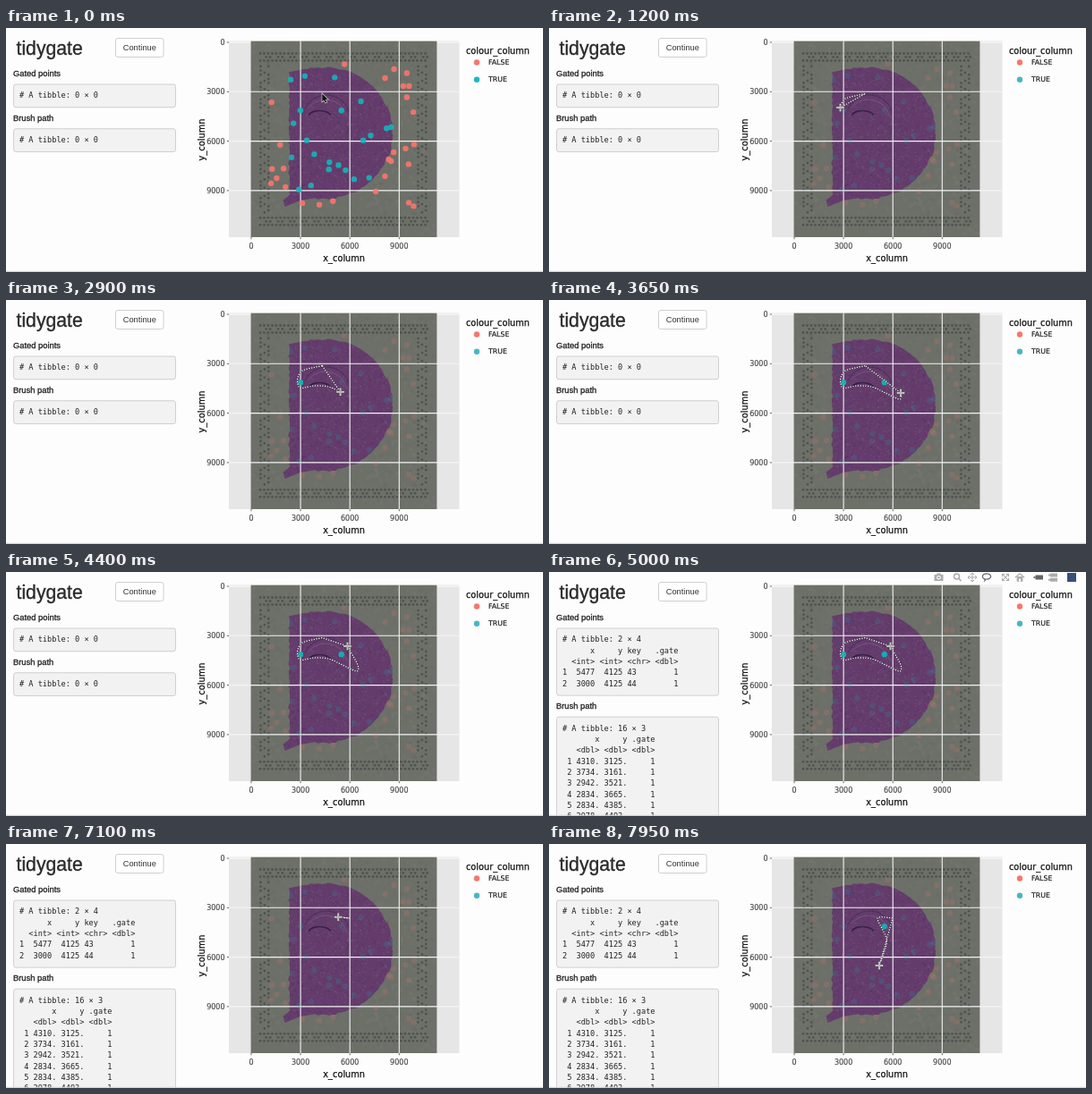
An HTML page with a canvas for the animation above (8 s loop, 600 px wide and 273 px high).

```html
<!DOCTYPE html>
<html lang="en">
<head>
<meta charset="utf-8">
<title>tidygate</title>
<style>
html, body { margin: 0; width: 100%; height: 100%; overflow: hidden; background: #fdfdfd; }
canvas { display: block; width: 600px; height: 273px; }
</style>
</head>
<body>
<canvas id="stage"></canvas>
<script>
const W = 600, H = 273, LOOP = 8000;
const PRESS = 600, TABLES = 4700, SECOND = 6900;
const SANS = '"Liberation Sans", Arial, sans-serif';
const PLOT = '"DejaVu Sans", Verdana, sans-serif';
const MONO = '"DejaVu Sans Mono", monospace';
const SALMON = '#f8766d', TEAL = '#14b4ba', PAGE = '#fdfdfd';
const dpr = window.devicePixelRatio || 1;

function makeCanvas(el) {
  el.width = W * dpr;
  el.height = H * dpr;
  const c = el.getContext('2d');
  c.scale(dpr, dpr);
  return c;
}
const ctx = makeCanvas(document.getElementById('stage'));
const plot = document.createElement('canvas');
const probe = document.createElement('canvas').getContext('2d');
const inPath = (path, x, y) => probe.isPointInPath(path, x, y);

// Lasso key points: time, x, y
const LASSO_A = [[PRESS, 353.3, 73.5], [1000, 331, 79], [1200, 325.5, 89], [1600, 328.5, 98.5],
  [2100, 344, 96], [2600, 362, 97.5], [3350, 391, 111], [3650, 393, 104], [4400, 381.5, 83]];
const LASSO_B = [[SECOND, 384, 83], [7200, 367, 83], [7600, 377.5, 108], [7950, 369, 136]];

const GATED = ['# A tibble: 2 × 4', '      x     y key   .gate', '  <int> <int> <chr> <dbl>',
  '1  5477  4125 43        1', '2  3000  4125 44        1'];
const BRUSH = ['# A tibble: 16 × 3', '       x     y .gate', '   <dbl> <dbl> <dbl>',
  ' 1 4310. 3125.     1', ' 2 3734. 3161.     1', ' 3 2942. 3521.     1',
  ' 4 2834. 3665.     1', ' 5 2834. 4385.     1', ' 6 2978. 4493.     1'];
const EMPTY = ['# A tibble: 0 × 0'];

function randomFrom(seed) {
  return () => (seed = (seed * 16807) % 2147483647) / 2147483647;
}

function text(c, str, x, y, size, family, color = '#333', align = 'left', bold = 0) {
  c.font = `${size}px ${family}`;
  c.fillStyle = c.strokeStyle = color;
  c.textAlign = align;
  c.fillText(str, x, y);
  if (bold) {
    c.lineWidth = bold;
    c.strokeText(str, x, y);
  }
}

function dot(c, x, y, r, color) {
  c.fillStyle = color;
  c.beginPath();
  c.arc(x, y, r, 0, 7);
  c.fill();
}

function line(c, pts, color, width) {
  c.strokeStyle = color;
  c.lineWidth = width;
  c.beginPath();
  for (let i = 0; i < pts.length; i += 2) c.lineTo(pts[i], pts[i + 1]);
  c.stroke();
}

function arc(c, x, y, rx, ry, from, to, color, width) {
  c.strokeStyle = color;
  c.lineWidth = width;
  c.beginPath();
  c.ellipse(x, y, rx, ry, 0, from, to);
  c.stroke();
}

function box(c, x, y, w, h, fill, border) {
  c.beginPath();
  c.roundRect(x, y, w, h, 2.5);
  c.fillStyle = fill;
  c.fill();
  c.strokeStyle = border;
  c.lineWidth = 0.8;
  c.stroke();
}

// Half an ellipse on the right, a ragged straight cut on the left
function makeTissue() {
  const rnd = randomFrom(23), path = new Path2D();
  const rough = (x, y) => path.lineTo(x + rnd() * 2 - 1, y + rnd() * 2 - 1);
  for (let a = -1.85; a < 1.75; a += 0.05) rough(355 + 77 * Math.cos(a), 117.5 + 73.5 * Math.sin(a));
  rough(329, 193);
  rough(312, 199);
  rough(309, 193);
  for (let y = 188; y > 48; y -= 2.5) rough(316.5, y);
  path.closePath();
  return path;
}
const tissue = makeTissue();

// Scatter: the colour tells whether a point lies on the tissue
function makePoints() {
  const rnd = randomFrom(90), left = { true: 20, false: 28 };
  const points = [329, 374.7].map(x => ({ x, y: 92.3, on: true }));
  while (left.true + left.false) {
    const x = 296 + rnd() * 162, y = 38 + rnd() * 162, on = inPath(tissue, x, y);
    const gated = Math.hypot((x - 360) / 40, (y - 94) / 26) < 1;
    if (gated || !left[on]) continue;
    left[on]--;
    points.push({ x, y, on });
  }
  return points;
}
const points = makePoints();

function drawFiducials(c) {
  const color = '#50544f';
  for (let i = 0; i < 42; i++) {
    const x = 284 + i * 4.5;
    for (const top of [28.5, 212.3]) {
      dot(c, x, top, 1.4, color);
      dot(c, x, top + 8, 1.4, color);
      if (i % 3) dot(c, x + 2.2, top + 4, 1.4, color);
    }
  }
  for (let i = 0; i < 36; i++) {
    const y = 43 + i * 4.6;
    for (const x of [284.5, 460.5]) {
      if (i % 4 < 3) dot(c, x, y, 1.4, color);
      if (i % 2) dot(c, x + 4.4, y + 2.3, 1.4, color);
      if (i % 4 !== 1) dot(c, x + 8.8, y, 1.4, color);
    }
  }
}

function drawTissue(c) {
  const rnd = randomFrom(41), shades = ['#512f5e', '#7a4f80', '#5f4a72', '#70396c', '#77627e'];
  c.save();
  c.fillStyle = '#643c6c';
  c.fill(tissue);
  c.clip(tissue);
  for (let i = 0; i < 4000; i++) {
    c.globalAlpha = 0.15 + rnd() * 0.35;
    c.fillStyle = shades[i % 5];
    c.fillRect(308 + rnd() * 126, 42 + rnd() * 158, 0.7 + rnd() * 1.8, 0.7 + rnd() * 1.4);
  }
  c.globalAlpha = 0.6;
  arc(c, 358, 103, 27, 28, 3.6, 6.9, '#422a52', 1.2);
  arc(c, 357, 104, 24, 24, 3.8, 6.1, '#82658c', 1);
  c.globalAlpha = 0.85;
  arc(c, 350.5, 100, 13, 7.5, 3.5, 5.9, '#2e1c43', 1.7);
  c.restore();
}

function drawPlot() {
  const c = makeCanvas(plot), rnd = randomFrom(7), ink = '#111';
  c.fillStyle = '#e6e6e6';
  c.fillRect(249, 14.5, 257.5, 219.5);
  line(c, [249, 16, 506.5, 16], '#fff', 1.1);
  c.fillStyle = '#6d7068';
  c.fillRect(273.6, 14.7, 207.8, 219.3);
  for (let i = 0; i < 700; i++) {
    c.fillStyle = i % 2 ? 'rgba(255,255,255,.02)' : 'rgba(0,0,0,.02)';
    c.fillRect(274 + rnd() * 203, 15 + rnd() * 214, 4, 4);
  }
  drawFiducials(c);
  drawTissue(c);

  for (let i = 0; i < 4; i++) {
    const x = 274 + i * 55.1, y = 16 + i * 55.3, label = String(i * 3000);
    if (i) {
      line(c, [249, y, 506.5, y], '#f4f4f4', 1.1);
      line(c, [x, 14.5, x, 234], '#f4f4f4', 1.1);
    }
    line(c, [246.8, y, 249, y], '#444', 0.8);
    line(c, [x, 234, x, 236.3], '#444', 0.8);
    text(c, label, 244.5, y + 3, 8, PLOT, '#444', 'right', 0.15);
    text(c, label, x, 246.8, 8, PLOT, '#444', 'center', 0.15);
  }
  text(c, 'x_column', 377.7, 260.8, 9.8, PLOT, ink, 'center', 0.25);
  c.save();
  c.translate(222, 125);
  c.rotate(-Math.PI / 2);
  text(c, 'y_column', 0, 0, 9.8, PLOT, ink, 'center', 0.25);
  c.restore();
  text(c, 'colour_column', 514, 28.5, 9.75, PLOT, ink, 'left', 0.25);
  text(c, 'FALSE', 539, 41.3, 7.8, PLOT, ink, 'left', 0.15);
  text(c, 'TRUE', 539, 60.3, 7.8, PLOT, ink, 'left', 0.15);
}

// Draws a titled listing and returns the baseline of the next title
function drawTable(title, rows, y) {
  const height = 13.4 + rows.length * 12.35;
  text(ctx, title, 8, y, 9.35, SANS, '#222', 'left', 0.3);
  box(ctx, 8.5, y + 8.7, 181, height, '#f2f2f2', '#c6c6c6');
  rows.forEach((row, i) => text(ctx, row, 15, y + 24.1 + i * 12.35, 8.6, MONO, '#222'));
  return y + height + 24;
}

function drawPanel(filled) {
  text(ctx, 'tidygate', 11.5, 30, 21.2, SANS, '#2b2b2b', 'left', 0.35);
  box(ctx, 122.5, 11.5, 53.5, 21, '#fff', '#c4c4c4');
  text(ctx, 'Continue', 149.3, 25.2, 9.3, SANS, '#333', 'center');
  const next = drawTable('Gated points', filled ? GATED : EMPTY, 54.3);
  drawTable('Brush path', filled ? BRUSH : EMPTY, next);
}

function drawModebar(alpha) {
  if (alpha <= 0) return;
  const grey = '#ababab', dark = '#666';
  const rect = (x, y, w, h, color = grey) => {
    ctx.fillStyle = color;
    ctx.fillRect(x, y, w, h);
  };
  const tag = (x, y, w, h, color) => {
    rect(x + 2, y, w - 2, h, color);
    rect(x, y + h / 2 - 1, 2, 2, color);
  };
  ctx.save();
  ctx.globalAlpha = alpha;
  // Camera and zoom
  rect(430.5, 3, 10, 7);
  rect(433.3, 1.5, 4.4, 2);
  dot(ctx, 435.5, 6.3, 2.3, PAGE);
  dot(ctx, 435.5, 6.3, 1.2, grey);
  arc(ctx, 455.5, 5, 3, 3, 0, 7, grey, 1.5);
  line(ctx, [457.7, 7.2, 460.5, 10], grey, 1.7);
  // Pan and autoscale
  for (let k = 0; k < 4; k++) {
    for (const [x, turn] of [[473, 0], [510, Math.PI / 4]]) {
      ctx.save();
      ctx.translate(x, 6);
      ctx.rotate(k * Math.PI / 2 + turn);
      line(ctx, [0, 0, 5, 0], grey, 1);
      line(ctx, [3, -2, 5, 0, 3, 2], grey, 1);
      ctx.restore();
    }
  }
  // Lasso
  arc(ctx, 489, 5, 4.6, 3.2, 0, 7, dark, 1.3);
  line(ctx, [486, 7.3, 487.5, 9, 486, 10.7], dark, 1.1);
  // Home
  line(ctx, [520.8, 6.3, 526, 1.8, 531.2, 6.3], grey, 1.2);
  rect(522.7, 5, 6.7, 5.7);
  rect(525.1, 7.4, 1.9, 3.3, PAGE);
  // Hover labels and badge
  tag(541.5, 3.5, 10.5, 5, dark);
  tag(558, 1.5, 10, 4, grey);
  tag(558, 6.7, 10, 4, grey);
  rect(579, 1, 10, 10, '#36507c');
  ctx.restore();
}

// Slightly tightened Catmull-Rom spline through timed points
function positionAt(keys, t) {
  const last = keys.length - 1;
  const i = Math.max(0, keys.findLastIndex(key => key[0] <= t));
  const key = n => keys[Math.min(last, Math.max(0, n))];
  const [a, b, c, d] = [key(i - 1), key(i), key(i + 1), key(i + 2)];
  const k = b === c ? 0 : Math.max(0, (t - b[0]) / (c[0] - b[0]));
  return [1, 2].map(n => {
    const m0 = (c[n] - a[n]) * 0.35, m1 = (d[n] - b[n]) * 0.35, gap = c[n] - b[n];
    return b[n] + k * (m0 + k * (3 * gap - 2 * m0 - m1 + k * (m0 + m1 - 2 * gap)));
  });
}

function lassoPath(keys, t) {
  const path = new Path2D();
  const end = Math.min(t, keys[keys.length - 1][0]);
  for (let s = keys[0][0]; s < end; s += 50) path.lineTo(...positionAt(keys, s));
  path.lineTo(...positionAt(keys, end));
  path.closePath();
  return path;
}

function drawLasso(path) {
  ctx.save();
  ctx.lineWidth = 1.2;
  ctx.strokeStyle = 'rgba(40,30,45,.75)';
  ctx.stroke(path);
  ctx.setLineDash([1.4, 1.4]);
  ctx.strokeStyle = '#fff';
  ctx.stroke(path);
  ctx.restore();
}

function drawPoints(lasso) {
  for (const { x, y, on } of points) {
    ctx.globalAlpha = !lasso || inPath(lasso, x, y) ? 0.9 : 0.16;
    dot(ctx, x, y, 3.2, on ? TEAL : SALMON);
  }
  ctx.globalAlpha = 1;
}

function drawArrow(x, y) {
  const tip = new Path2D('M0 0V8.8L2 7L3.4 10.2L5 9.5L3.6 6.4L6.3 6.2Z');
  ctx.save();
  ctx.translate(x, y);
  ctx.strokeStyle = '#ddd';
  ctx.lineWidth = 1.3;
  ctx.stroke(tip);
  ctx.fillStyle = '#111';
  ctx.fill(tip);
  ctx.restore();
}

function drawCross(x, y, r) {
  for (const [color, width, reach] of [['#555', 3, r + 0.5], ['#e2e2e2', 1.7, r], ['#888', 0.5, r - 1]]) {
    line(ctx, [x - reach, y, x + reach, y], color, width);
    line(ctx, [x, y - reach, x, y + reach], color, width);
  }
}

function ramp(t, from, span) {
  return Math.min(1, Math.max(0, (t - from) / span));
}

function draw(t) {
  const keys = t < SECOND ? LASSO_A : LASSO_B;
  const lasso = t < PRESS ? null : lassoPath(keys, t);
  const [x, y] = positionAt(keys, t);
  const idle = t > 6000 && t < SECOND;

  ctx.fillStyle = PAGE;
  ctx.fillRect(0, 0, W, H);
  drawPanel(t >= TABLES);
  ctx.drawImage(plot, 0, 0, W, H);
  drawPoints(lasso);
  dot(ctx, 526, 38.5, 3.2, SALMON);
  dot(ctx, 526, 57.7, 3.2, lasso ? '#4cb5c5' : '#22b5bc');
  if (lasso) drawLasso(lasso);
  drawModebar(ramp(t, 4500, 300) - ramp(t, 5930, 300));
  if (!lasso) drawArrow(x, y);
  else drawCross(x + (idle ? 2.5 : 0), y, idle ? 2.6 : 4.2);
  line(ctx, [0, 272.3, W, 272.3], '#cfcfcf', 1);
}

function tick(now) {
  draw(now % LOOP);
  requestAnimationFrame(tick);
}

drawPlot();
draw(0);
requestAnimationFrame(tick);
</script>
</body>
</html>
```
